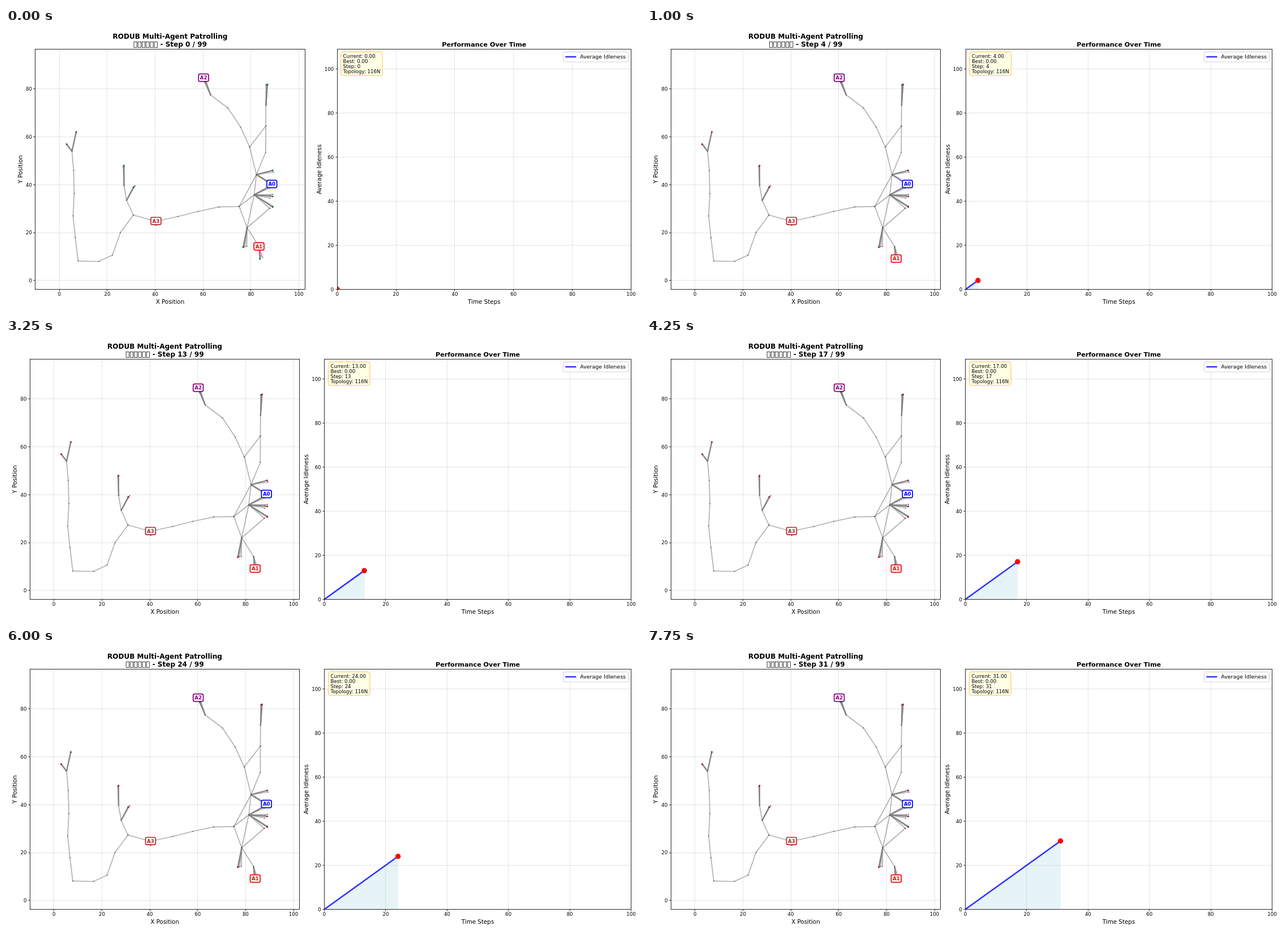
An HTML page for the animation above (8 s loop, 1122 px wide and 499 px high).

```html
<!DOCTYPE html>
<html lang="en">
<head>
<meta charset="utf-8">
<title>Multi-Agent Patrolling</title>
<style>
  html, body { margin: 0; width: 100%; height: 100%; overflow: hidden; background: #fff; }
  svg { display: block; }
  text { font-family: "DejaVu Sans", sans-serif; white-space: pre; }
</style>
</head>
<body>
<svg id="stage" width="1122" height="499"></svg>
<script>
const STEP = 250, STEPS = 32;
const TOP = 37.7, BOTTOM = 462.3, RIGHT = 1104.5;
const TICK = 8.6, LABEL = 10.33, TITLE = 12.04;

// Corridors of the patrol graph
const chains = [
  "107,218 110,252 111,293 109,332.5 113,371 118,412.3 154.5,413 178.5,402 192.5,362 215.5,331 255,342 294.5,333.5 330,324.5 367,316.7 402.5,315.8",
  "215.5,331 203.5,305 199,279",
  "402.5,315.8 433,259.5 421,210.5 405,175.3 382.5,141.5 352,118.5",
  "421,210.5 449.5,173.5 449.8,137",
  "433,259.5 449.3,220 449.5,173.5",
  "402.5,315.8 429,295.3 433,259.5",
  "402.5,315.8 416.5,353.5 429,295.3",
  "416.5,353.5 437.5,386.5",
  "416.5,353.5 456.5,319"
];

// Hub, crowded tips, sparse tips
const fans = [
  ["107,218", "97.5,205.5 114.5,184", ""],
  ["199,279", "198.8,243.5", "197.5,245.5"],
  ["203.5,305", "216,281.3", "218.5,279"],
  ["352,118.5", "342.5,95", "340.5,94 344.5,95"],
  ["449.8,137", "452,100", "449.8,101 451,100 453,99.5"],
  ["433,259.5", "461.5,252 460,276", "463,255 456,275"],
  ["429,295.3", "460,278 461.5,298 461.5,316", "457,283 462,294.5 458,296 457,301 462,317.5 456.5,319"],
  ["416.5,353.5", "410,387.5", "409,388.5 413,387 416,386.5"],
  ["437.5,386.5", "439.3,408.5", "441,404 444,406"]
];

const stage = document.getElementById("stage");
const snap = v => Math.floor(v) + .5;
const points = s => s ? s.split(" ") : [];
const text = (x, y, size, str, extra = "") =>
  `<text x="${x}" y="${y}" font-size="${size}" ${extra}>${str}</text>`;
const mid = 'text-anchor="middle"', bold = 'font-weight="bold"';
const line = (x1, y1, x2, y2, extra) =>
  `<path d="M${x1},${y1}L${x2},${y2}" ${extra}/>`;
const rect = (x, y, w, h, extra) =>
  `<rect x="${x}" y="${y}" width="${w}" height="${h}" ${extra}/>`;
const dot = (p, r, extra) => {
  const [x, y] = p.split(",");
  return `<circle cx="${x}" cy="${y}" r="${r}" ${extra}/>`;
};

function grid(xs, ys, left, right) {
  const style = 'stroke="#b0b0b0" stroke-opacity=".42" stroke-width=".8"';
  return xs.map(([x]) => line(snap(x), TOP, snap(x), BOTTOM, style)).join("") +
    ys.map(([y]) => line(left, snap(y), right, snap(y), style)).join("");
}

function frame(xs, ys, left, right, xName, yName, yGap) {
  const ink = 'stroke="#000" stroke-width=".85" fill="none"', l = snap(left);
  const nameX = left - yGap;
  return rect(l, 37.5, snap(right) - l, 425, ink) +
    xs.map(([x, n]) => line(snap(x), 462.5, snap(x), 465.5, ink) + text(x, 474.2, TICK, n, mid)).join("") +
    ys.map(([y, n]) => line(l - 3, snap(y), l, snap(y), ink) +
      text(left - 6, y + 3.2, TICK, n, 'text-anchor="end"')).join("") +
    text((left + right) / 2, 488, LABEL, xName, mid) +
    text(nameX, 250, LABEL, yName, `${mid} transform="rotate(-90 ${nameX} 250)"`);
}

const ticks = (count, pos) => Array.from({ length: count }, (_, i) => [pos(i * 20), i * 20]);

function graph(color) {
  const edge = (a, b, width = 1.72) =>
    line(...a.split(","), ...b.split(","), `stroke="gray" stroke-opacity=".6" stroke-width="${width}"`);
  let edges = "", nodes = "";
  for (const chain of chains) {
    const p = points(chain);
    p.forEach((q, i) => {
      if (i) edges += edge(p[i - 1], q);
      nodes += dot(q, 1.1, 'fill="#666" fill-opacity=".7"') + dot(q, .9, `fill="${color}" fill-opacity=".35"`);
    });
  }
  for (const [hub, crowded, sparse] of fans) {
    for (const q of points(sparse)) {
      edges += edge(hub, q);
      nodes += dot(q, 1.2, `fill="${color}" fill-opacity=".55"`);
    }
    for (const q of points(crowded)) {
      edges += edge(hub, q, 2.2).repeat(3);
      nodes += dot(q, 1.6, `fill="${color}"`);
    }
  }
  return edges + nodes;
}

function agent(name, x, y, color) {
  return rect(x - 8.9, y - 6.6, 17.8, 13.2,
    `rx="2.6" fill="#fff" fill-opacity=".92" stroke="${color}" stroke-width="1.72"`) +
    text(x, y + 3.1, TICK, name, `${mid} ${bold} fill="${color}"`);
}

function heading(x, step) {
  const start = x - (step > 9 ? 69.3 : 65), cell = TITLE * .6;
  let out = text(x, 19, TITLE, "RODUB Multi-Agent Patrolling", `${mid} ${bold}`);
  for (let i = 0; i < 6; i++)
    out += rect(start + i * cell + 1, 24.5, 5.3, 9.9, 'fill="none" stroke="#000" stroke-width=".75"');
  return out + text(start + 6 * cell + 4.2, 32.9, TITLE, `- Step ${step} / 99`, bold);
}

function mapPanel(step) {
  const shift = step ? 0 : 9.5, left = 42.4 + shift, right = 518.5 + shift;
  const xs = ticks(6, v => 84.8 + shift + v * 4.232);
  const ys = ticks(5, v => 446.9 - v * 4.24);
  const a1 = step ? [440.3, 408] : [437.5, 386.5];
  return grid(xs, ys, left, right) +
    `<g transform="translate(${shift})">` + graph(step ? "#8f1f2b" : "#1c6b1c") +
    dot("255.7,348", 1.9, 'fill="#b02a2a"') +
    agent("A0", 460.2, 276, "#0000ff") + agent("A1", ...a1, "#f5060c") +
    agent("A2", 339.6, 88, "#800080") + agent("A3", 255.4, 341.6, "#ac2a2a") + "</g>" +
    frame(xs, ys, left, right, "X Position", "Y Position", 23.2) +
    heading((left + right) / 2, step);
}

function chartPanel(step) {
  const left = 562.6 + 22.6 * .39 ** step;   // layout settles over the first steps
  const px = v => left + v * (RIGHT - left) / 100, py = v => BOTTOM - v * 3.897;
  const xs = ticks(6, px), ys = ticks(6, py);
  const x = px(step), y = py(step), boxX = left + (RIGHT - left) * .02;
  const blue = 'stroke="#00f" stroke-opacity=".8" stroke-width="2.58"';
  const info = [`Current: ${step.toFixed(2)}`, "Best: 0.00", `Step: ${step}`, "Topology: 116N"];
  return `<clipPath id="plot">${rect(left, TOP, RIGHT - left, BOTTOM - TOP, "")}</clipPath><g clip-path="url(#plot)">` +
    (step > 1 ? `<path d="M${left},${BOTTOM}L${x},${y}V${BOTTOM}Z" fill="#add8e6" stroke="#add8e6" stroke-width=".86" opacity=".31"/>` : "") +
    grid(xs, ys, left, RIGHT) + line(left, BOTTOM, x, y, blue) +
    dot(`${x},${y}`, 4.7, 'fill="#f00"') + "</g>" +
    frame(xs, ys, left, RIGHT, "Time Steps", "Average Idleness", 28.3) +
    text((left + RIGHT) / 2, 33, 11.2, "Performance Over Time", `${mid} ${bold}`) +
    rect(boxX - 4, 42.2, 73.6, 41.8, 'rx="4" fill="#ffffe6" stroke="#ffb733" stroke-width=".86"') +
    info.map((s, i) => text(boxX, 52.6 + i * 9.15, TICK, s)).join("") +
    rect(984.5, 42.5, 115, 17.5, 'rx="1.9" fill="#fff" fill-opacity=".8" stroke="#ccc" stroke-width=".86"') +
    line(988.3, 51, 1007.5, 51, blue) + text(1014.3, 54.4, 9.46, "Average Idleness");
}

let shown = -1;
function tick() {
  const step = Math.floor(performance.now() / STEP) % STEPS;
  if (step !== shown) {
    shown = step;
    stage.innerHTML = mapPanel(step) + chartPanel(step);
  }
  requestAnimationFrame(tick);
}
tick();
</script>
</body>
</html>
```
